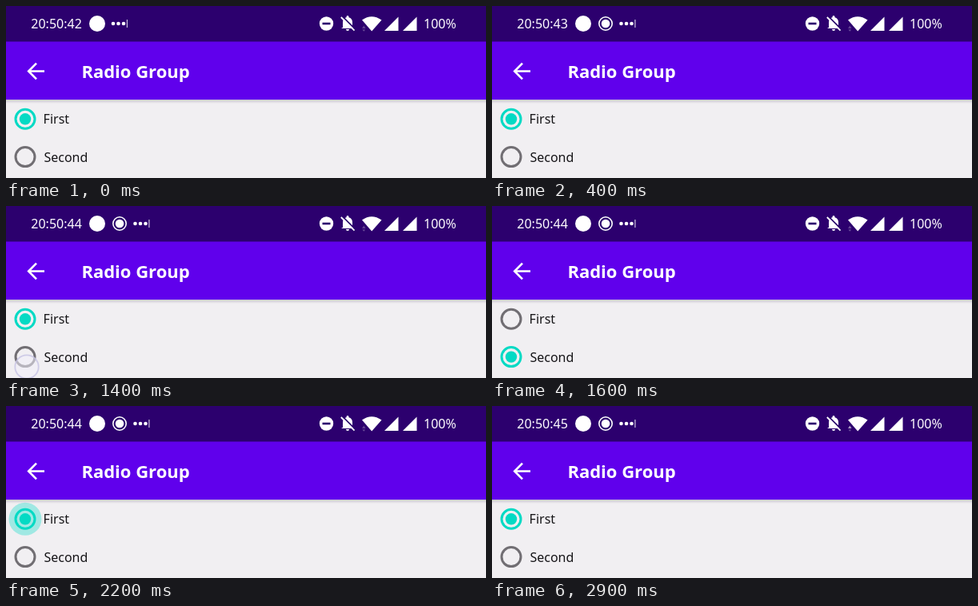
These frames come from a looping animation (600 by 215 pixels, 3000 ms). An HTML page:

```html
<!DOCTYPE html>
<html lang="en">
<head>
<meta charset="utf-8">
<title>Radio Group</title>
<style>
  html, body { margin: 0; width: 100%; height: 100%; overflow: hidden; background: #f1eff2; }
  svg { display: block; width: 600px; height: 215px; }
  text { font-family: "Noto Sans", "Open Sans", sans-serif; font-size: 16px; }
</style>
</head>
<body>
<svg viewBox="0 0 600 215" xmlns="http://www.w3.org/2000/svg">
  <defs>
    <linearGradient id="shade" x1="0" y1="0" x2="0" y2="1">
      <stop offset="0" stop-color="#c9c6cd"/>
      <stop offset="1" stop-color="#f1eff2"/>
    </linearGradient>
    <g id="radio" fill="none" stroke="currentColor">
      <circle r="12" stroke-width="3"/>
    </g>
  </defs>

  <rect width="600" height="215" fill="#f1eff2"/>
  <rect y="117" width="600" height="5" fill="url(#shade)"/>
  <rect y="44" width="600" height="73" fill="#6000ec"/>
  <rect width="600" height="44.5" fill="#2c006e"/>

  <g fill="#fff">
    <text id="clock" x="31.3" y="28"></text>
    <circle cx="114" cy="22" r="10"/>
    <g id="record">
      <circle r="8.2" fill="none" stroke="#fff" stroke-width="1.6"/>
      <circle r="5.3"/>
    </g>
    <g id="dots">
      <circle cx="134" cy="22" r="2.3"/>
      <circle cx="140.5" cy="22" r="2.3"/>
      <circle cx="147" cy="22" r="2.3"/>
      <rect x="150.8" y="17" width="1.2" height="10" opacity=".75"/>
    </g>

    <circle cx="400.5" cy="22" r="8.7"/>
    <rect x="395.5" y="20.7" width="10" height="2.6" fill="#2c006e"/>

    <path d="M421 27V20.5Q421 15.5 425.5 14.3V13.6A1.5 1.5 0 0 1 428.5 13.6V14.3Q433 15.5 433 20.5V25.5L435 28H419.5V27.5Z"/>
    <path d="M425 29H429A2 2 0 0 1 425 29Z"/>
    <path d="M420.3 12.8L437 29.5" stroke="#2c006e" stroke-width="1.8"/>
    <path d="M418.8 14L435.5 30.7" stroke="#fff" stroke-width="1.8"/>

    <path d="M445 17.5Q457 9 469.5 17.5L457.2 31.5Z"/>
    <path id="up" d="M445 28L447.3 24.5L449.6 28Z"/>
    <path d="M445.4 29.4H449.2L447.3 31.8Z" opacity=".3"/>
    <path d="M473 31H490.5V13.5ZM496 31H513.5V13.5Z"/>
    <text x="522" y="28">100%</text>

    <path d="M48 81.5H29M38 71.7L28.2 81.5L38 91.3" fill="none" stroke="#fff" stroke-width="2.6"/>
    <text x="94.4" y="89.6" style="font-size:22px;font-weight:700">Radio Group</text>
  </g>

  <circle id="ripple" cx="24" r="20.5" fill="#03dac4" opacity=".34"/>
  <g id="first" transform="translate(24 141.3)">
    <use href="#radio"/><circle class="mark" r="7.2" fill="currentColor"/>
  </g>
  <g id="second" transform="translate(24 188.6)">
    <use href="#radio"/><circle class="mark" r="7.2" fill="currentColor"/>
  </g>
  <circle id="touch" r="14.7" fill="#f0eefa" fill-opacity=".55" stroke="#c6c2e4" stroke-opacity=".8" stroke-width="1.8"/>
  <g fill="#161518">
    <text x="46.6" y="147.2">First</text>
    <text x="47.4" y="194.8">Second</text>
  </g>
</svg>
<script>
  const LOOP = 3000, STEP = 100;
  const el = id => document.getElementById(id);
  const within = (t, a, b) => t >= a && t < b;
  const show = (node, on) => node.setAttribute("visibility", on ? "visible" : "hidden");

  function setRadio(id, on) {
    const g = el(id);
    g.setAttribute("color", on ? "#03dac4" : "#716e73");
    show(g.querySelector(".mark"), on);
  }

  function setTouch(t) {
    const onSecond = within(t, 1400, 1600), onFirst = within(t, 2100, 2200);
    show(el("touch"), onSecond || onFirst);
    el("touch").setAttribute("transform", onSecond ? "translate(26 201)" : "translate(19 145)");
  }

  function setRipple(t) {
    const onSecond = within(t, 1500, 1600), onFirst = within(t, 2200, 2300);
    show(el("ripple"), onSecond || onFirst);
    el("ripple").setAttribute("cy", onSecond ? 188.6 : 141.3);
  }

  function draw(time) {
    const t = Math.floor((time % LOOP) / STEP) * STEP;

    const seconds = 42 + (t >= 300) + (t >= 1300) + (t >= 2300);
    el("clock").textContent = "20:50:" + seconds;

    // a new status icon pushes the dots aside
    const p = Math.min(1, t / 300), slide = p * p * (3 - 2 * p);
    el("dots").setAttribute("transform", `translate(${27.5 * slide} 0)`);
    el("record").setAttribute("transform", `translate(142 22) scale(${slide})`);
    el("record").setAttribute("opacity", slide);
    el("up").setAttribute("opacity", within(t, 1000, 1300) || t >= 2900 ? 0.6 : 0.25);

    const second = within(t, 1500, 2200);
    setRadio("first", !second);
    setRadio("second", second);
    setRipple(t);
    setTouch(t);
  }

  const start = performance.now();
  function tick() {
    draw(performance.now() - start);
    requestAnimationFrame(tick);
  }
  tick();
</script>
</body>
</html>
```
